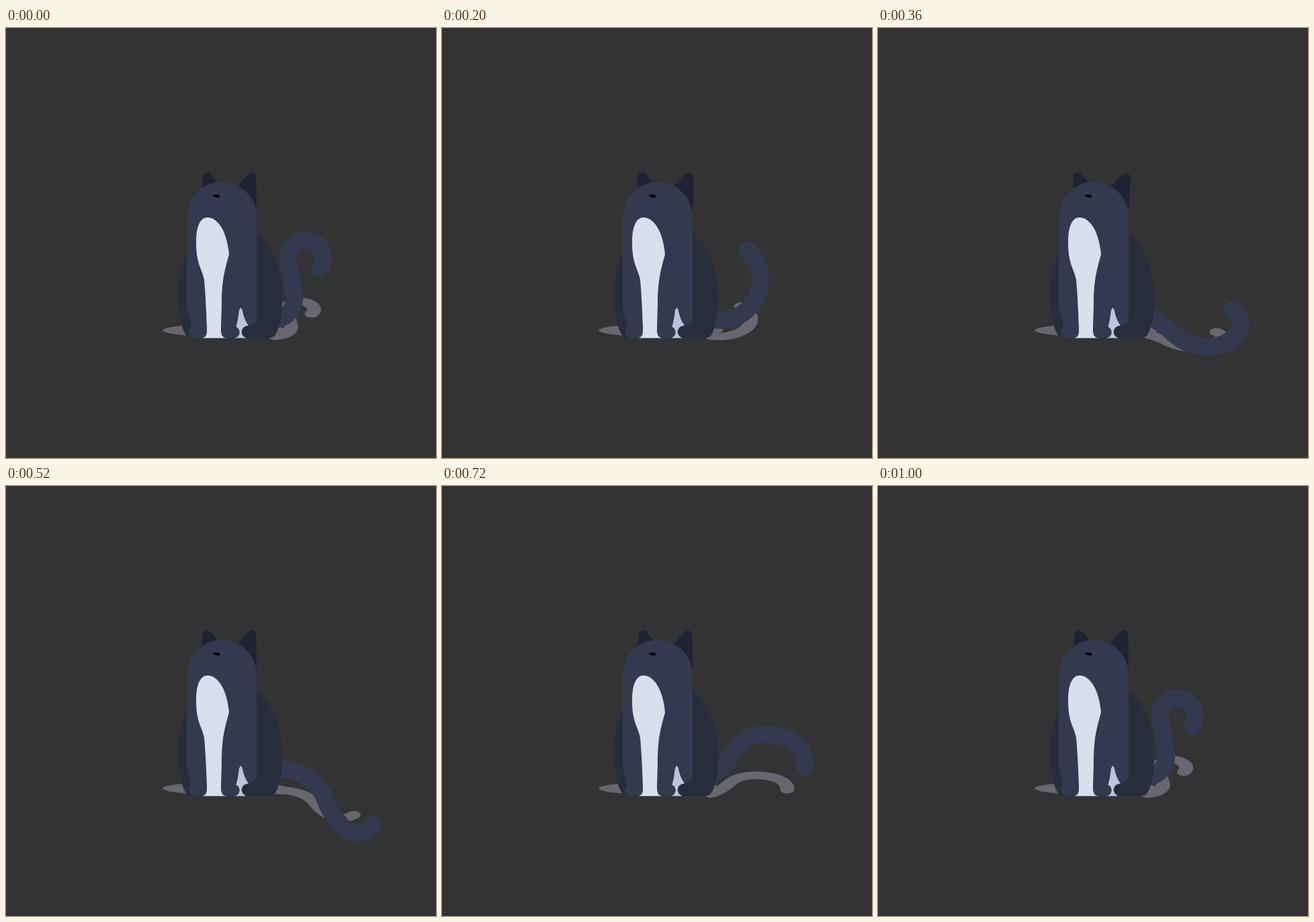
Recreate the animation shown at these times as an HTML page. Size 640 px wide and 640 px high, loop 1.04 s.

```html
<!DOCTYPE html>
<html lang="en">
<head>
<meta charset="utf-8">
<title>Cat flicking its tail</title>
<style>
  html, body { margin: 0; width: 100%; height: 100%; overflow: hidden; background: #333; }
  svg { display: block; width: 100vw; height: 100vh; }
</style>
</head>
<body>
<svg viewBox="0 0 640 640">
  <g fill="#68676f" stroke="#68676f">
    <ellipse cx="326" cy="450" rx="92.5" ry="9.7" stroke="none"/>
    <use href="#tail" transform="matrix(.8 0 0 .435 81 270)"/>
  </g>
  <g stroke="#33394e">
    <path id="tail" fill="none" stroke-width="26" stroke-linecap="round" stroke-linejoin="round"/>
  </g>
  <g id="ears" fill="#1e2233" stroke="#1e2233" stroke-width="14" stroke-linejoin="round">
    <path/><path/>
  </g>
  <!-- back and haunches -->
  <path fill="#282d3b" d="M274 461.5C263 459 255 425 255 395C255 372 261 351 269 337L373 304C398 325 411 362 411 402C411 425 408 440 403 453Q400 461.5 391 461.5Z"/>
  <!-- head and torso -->
  <path fill="#33394e" d="M269 281a52 52 0 0 1 104 0V430Q373 442 362 442L340 455H290L276 446C275 433 269 428 269 412Z"/>
  <!-- chest and gap between the legs -->
  <path fill="#d8deec" d="M300 282C315 282 329 302 332 337C326 359 321 375 321 412L320 446L327 461.5H293L299 446C298 420 297 398 295 375C292 358 283 352 283 320C283 295 289 282 300 282Z"/>
  <path fill="#bbc4da" d="M349 416.5Q351 417 352 421Q354 433 361 443L357 461.5H341L342 446C345 437 346 427 347 420Z"/>
  <!-- paws -->
  <g fill="#33394e">
    <path d="M281 444H299V452Q299 461.5 290 461.5H281A8.7 8.7 0 0 1 281 444Z"/>
    <path d="M320 444H339A8.7 8.7 0 0 1 339 461.5H329Q320 461.5 320 450Z"/>
  </g>
  <path fill="#282d3b" d="M360 443H392V461.5H360A9.2 9.2 0 0 1 360 443Z"/>
  <ellipse cx="313.3" cy="250" rx="5.3" ry="2.1" transform="rotate(10 313.3 250)"/>
</svg>
<script>
const LOOP = 1040, STEP = 40, ROOT_X = 400, PARTS = 40;
const tail = document.getElementById('tail');
const [leftEar, rightEar] = document.getElementById('ears').children;

// A tail is a chain of four arcs; headings (degrees) are given where arcs meet
function pose(time, rootY, length, ...headings) {
  const part = length / PARTS;
  let x = ROOT_X, y = rootY;
  const coords = [x, y];
  for (let i = 0; i < PARTS; i++) {
    const s = (i + .5) / PARTS * 4, k = Math.floor(s);
    const degrees = headings[k] + (headings[k + 1] - headings[k]) * (s - k);
    const a = degrees * Math.PI / 180;
    coords.push(x += part * Math.cos(a), y += part * Math.sin(a));
  }
  return { time, coords };
}

const curled = [434, 208, -5, -98, -102, 14, 124];
const poses = [
  pose(0, ...curled),
  pose(100, 432, 156, 5, -65, -88, -80, -62),
  pose(200, 433, 157, 14, -24, -62, -99, -138),
  pose(360, 427, 195, 28, 42, 6, -38, -145),
  pose(520, 421, 193, -6, 32, 70, 42, -52),
  pose(560, 416, 201, -8, 38, 76, 53, -34),
  pose(720, 433, 195, -36, -60, -9, 28, 94),
  pose(800, 427, 203, 10, -112, -72, 30, 112),
  pose(LOOP, ...curled)
];
const times = poses.map(p => p.time);

// Smooth interpolation through keys without overshoot
function glide(values, t) {
  const last = times.length - 1;
  const rate = i => (values[i + 1] - values[i]) / (times[i + 1] - times[i]);
  const slope = i => {
    if (i === 0 || i === last) return 0;
    const a = rate(i - 1), b = rate(i);
    return a * b > 0 ? 2 * a * b / (a + b) : 0;
  };
  let i = 0;
  while (i < last - 1 && t >= times[i + 1]) i++;
  const span = times[i + 1] - times[i], u = (t - times[i]) / span, v = 1 - u;
  return values[i] * v * v * (1 + 2 * u) + values[i + 1] * u * u * (3 - 2 * u)
    + span * u * v * (slope(i) * v - slope(i + 1) * u);
}

function draw(t) {
  const coords = poses[0].coords.map((_, k) => glide(poses.map(p => p.coords[k]), t));
  tail.setAttribute('d', 'M' + coords.join(' '));

  // Ears spread once while the tail swings down
  const u = Math.max(0, Math.min(1, (t - 40) / 480));
  const spread = Math.sin(Math.PI * u ** 1.7);
  leftEar.setAttribute('d', `M${299.5 - 2.5 * spread} 222L298 245L316 243Z`);
  rightEar.setAttribute('d', `M${365.5 + 3.5 * spread} ${222 + spread}L346 245L366 272Z`);
}

const start = performance.now();
function frame() {
  const t = (performance.now() - start) % LOOP;
  draw(Math.floor(t / STEP) * STEP);
  requestAnimationFrame(frame);
}
frame();
</script>
</body>
</html>
```
